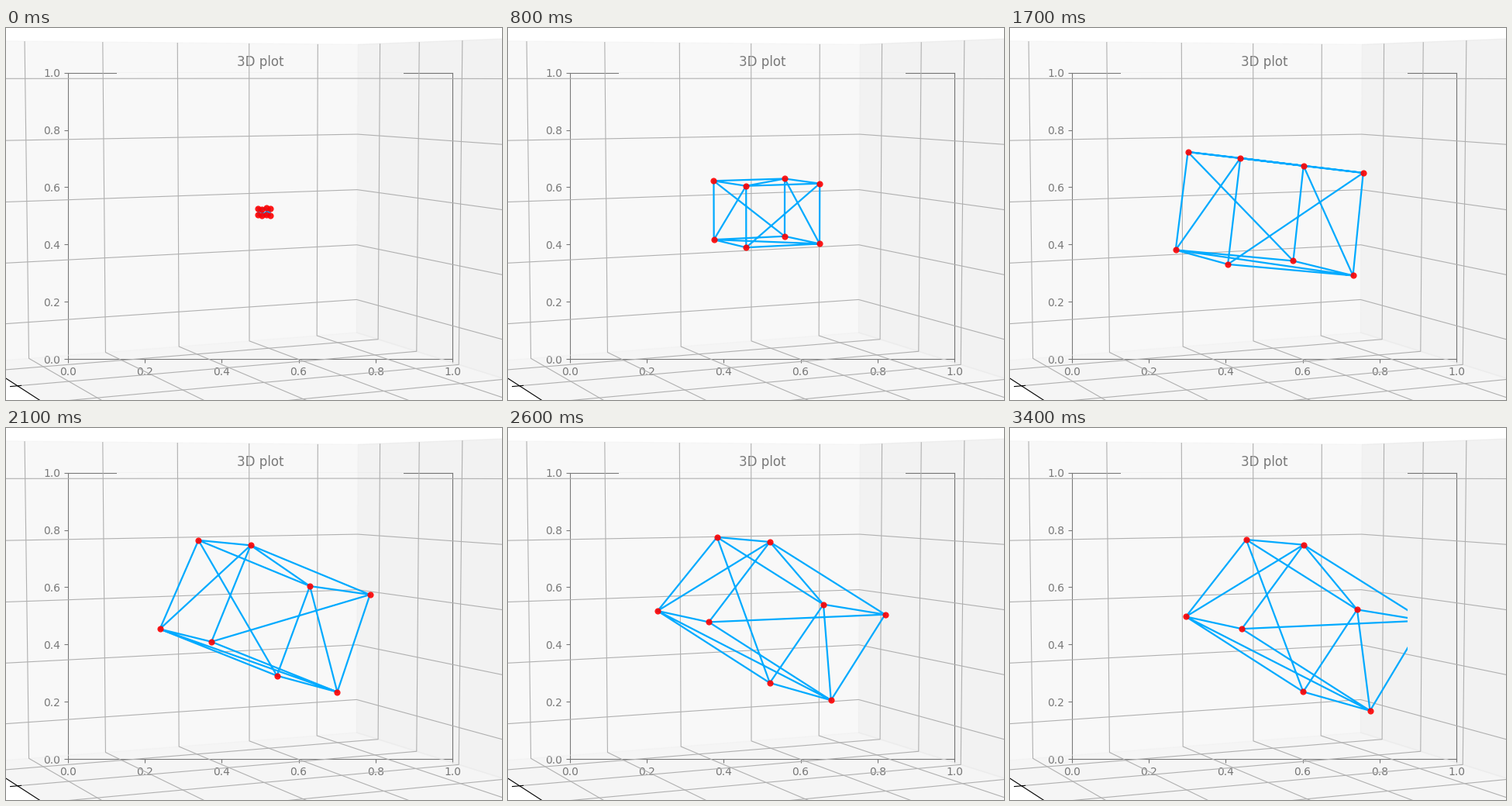
Animation of 640 by 480 pixels, one loop 3.5 s. Source, as a matplotlib script:

```python
import itertools

import matplotlib.pyplot as plt
import numpy as np
from matplotlib.animation import FuncAnimation

GROW, TURN, SLIDE = 15, 10, 10
LIMIT = 5 * 25 / 24
TICKS = range(-4, 5, 2)

# Cube corners, index = 4 * (x > 0) + 2 * (y > 0) + (z > 0)
CORNERS = np.array(list(itertools.product((-1, 1), repeat=3)), float)

# The twelve cube edges plus one diagonal on each face
SIDES = [(a, b) for a, b in itertools.combinations(range(8), 2)
         if bin(a ^ b).count("1") == 1]
DIAGONALS = [(5, 3), (0, 6), (1, 2), (5, 0), (7, 4), (3, 6)]
EDGES = SIDES + DIAGONALS


def cube_at(i):
    """Grow the cube, then twist it around x, then slide it along x."""
    x, y, z = 0.1 * min(i + 1, GROW) * CORNERS.T
    angle = np.radians(5 * np.clip(i - GROW, 0, TURN - 1))
    c, s = np.cos(angle), np.sin(angle)
    y, z = c * y + s * z, c * z - s * y
    x = x - s * z + 0.2 * max(0, i - GROW - TURN)
    return np.column_stack([x, y, z])


def wire(points):
    """Join all edges into one path, with gaps between them."""
    gap = np.full(3, np.nan)
    return np.array([p for a, b in EDGES for p in (points[a], points[b], gap)])


fig, flat = plt.subplots(figsize=(6.4, 4.8), dpi=100)
flat.set_title("3D plot")

ax = fig.add_subplot(111, projection="3d")
ax.set_box_aspect(None, zoom=2.5)
ax.view_init(elev=5, azim=-25)
for axis in "xyz":
    ax.set(**{axis + "ticks": TICKS, axis + "ticklabels": [],
              axis + "lim": (-LIMIT, LIMIT)})

lines, = ax.plot([], [], [], color="#00aaff", lw=1.6, zorder=2)
dots, = ax.plot([], [], [], "o", color="red", ms=5.9, mew=0, alpha=0.9,
                zorder=3)


def update(i):
    points = cube_at(i)
    lines.set_data_3d(*wire(points).T)
    dots.set_data_3d(*points.T)
    return lines, dots


anim = FuncAnimation(fig, update, frames=GROW + TURN + SLIDE, interval=100)
plt.show()
```
